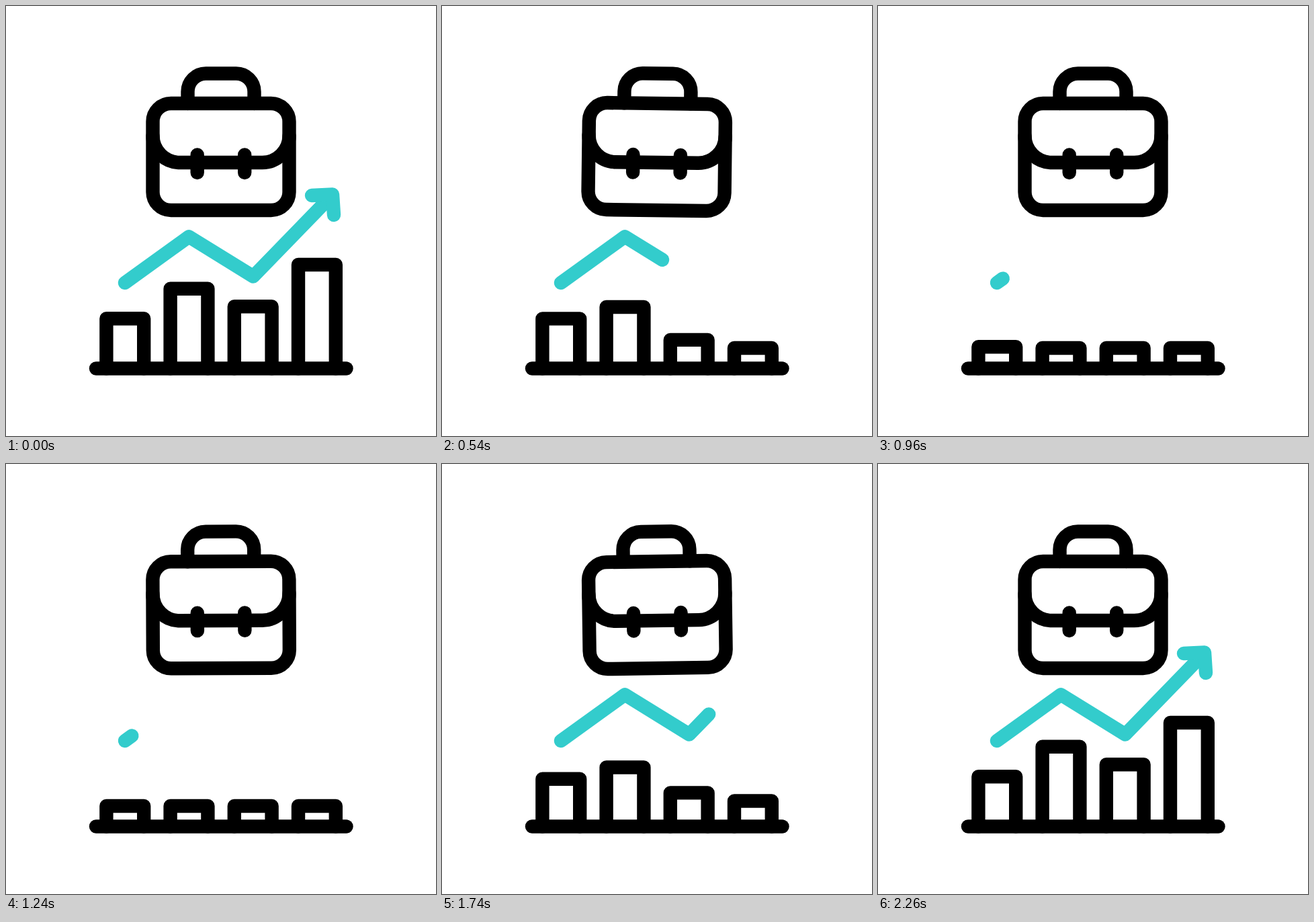
Animation of 640x640 px, one loop 2420 ms. Source, as an HTML page:

```html
<!DOCTYPE html>
<html lang="en">
<head>
<meta charset="utf-8">
<title>Business growth</title>
<style>
  html, body { margin: 0; height: 100%; overflow: hidden; background: #fff; }
  svg { display: block; width: 100%; height: 100%; }
  path { fill: none; stroke: #000; stroke-width: 20.4; stroke-linecap: round; stroke-linejoin: round; }
  .trend { stroke: #3cc; }
</style>
</head>
<body>
<svg viewBox="0 0 640 640">
  <g id="bars"></g>
  <path d="M134 539.5H506.5"/>
  <path id="shaft" class="trend" pathLength="1" d="M177 412L272.3 343.3L368 402.5L485 282"/>
  <path id="head" class="trend" pathLength="1" d="M455 282L486 280.5L488 311"/>
  <g id="briefcase">
    <path d="M270.5 145V127.5a27 27 0 0 1 27-27H342.5a27 27 0 0 1 27 27V145"/>
    <path d="M245.5 145H394.5a27 27 0 0 1 27 27V277a27 27 0 0 1-27 27H245.5a27 27 0 0 1-27-27V172a27 27 0 0 1 27-27Z"/>
    <path d="M218.5 193a40 40 0 0 0 40 40H381.5a40 40 0 0 0 40-40"/>
    <path d="M284.7 221.5V248M355.2 221.5V248"/>
  </g>
</svg>
<script>
const LOOP = 2420;
const BAR_LOW = 509;
const BAR_TOPS = [465.3, 420.7, 447.3, 385];
const SWING = [[0, 0], [345, -15], [650, 7.2], [830, 0]];
const SWING_STARTS = [0, 1215];

const $ = id => document.getElementById(id);
const ramp = (t, from, to) => Math.min(1, Math.max(0, (t - from) / (to - from)));
const smooth = u => u * u * (3 - 2 * u);
const ease = (t, from, to) => smooth(ramp(t, from, to));

// cubic-bezier(1/3, 0, 5/6, 5/6): gentle start, constant speed at the end
function easeIn(x) {
  let lo = 0, hi = 1;
  const y = s => 2.5 * (1 - s) * s * s + s ** 3;
  for (let i = 0; i < 24; i++) {
    const s = (lo + hi) / 2;
    if ((1 - s) ** 2 * s + y(s) < x) lo = s; else hi = s;
  }
  return y(lo);
}

const bars = BAR_TOPS.map(() =>
  $("bars").appendChild(document.createElementNS("http://www.w3.org/2000/svg", "path")));

function trim(path, amount) {
  path.style.visibility = amount > 0.0005 ? "visible" : "hidden";
  path.setAttribute("stroke-dasharray", amount >= 1 ? "none" : `${amount} 2`);
}

function swingAngle(t) {
  let angle = 0;
  for (let i = 1; i < SWING.length; i++) {
    const [from, a] = SWING[i - 1], [to, b] = SWING[i];
    angle += (b - a) * ease(t, from, to);
  }
  return angle;
}

function draw(t) {
  const growing = t >= 1100;

  bars.forEach((bar, i) => {
    const shrink = 20 + (3 - i) * 170, grow = 1294 + i * 122;
    const size = growing ? ease(t, grow, grow + 540) : 1 - ease(t, shrink, shrink + 490);
    const top = BAR_LOW + (BAR_TOPS[i] - BAR_LOW) * size;
    bar.setAttribute("d", `M${149.4 + i * 95.2} 539.5V${top}h55.8V539.5`);
  });

  trim($("shaft"), easeIn(growing ? ramp(t, 1143, 1937) : 1 - ramp(t, 164, 1063)));
  trim($("head"), growing ? ease(t, 1860, 2040) : 1 - ease(t, 10, 190));

  const angle = swingAngle(t - SWING_STARTS[growing ? 1 : 0]);
  $("briefcase").setAttribute("transform", `rotate(${angle} 320 201)`);
}

const start = performance.now();
function tick() {
  draw((performance.now() - start) % LOOP);
  requestAnimationFrame(tick);
}
tick();
</script>
</body>
</html>
```
